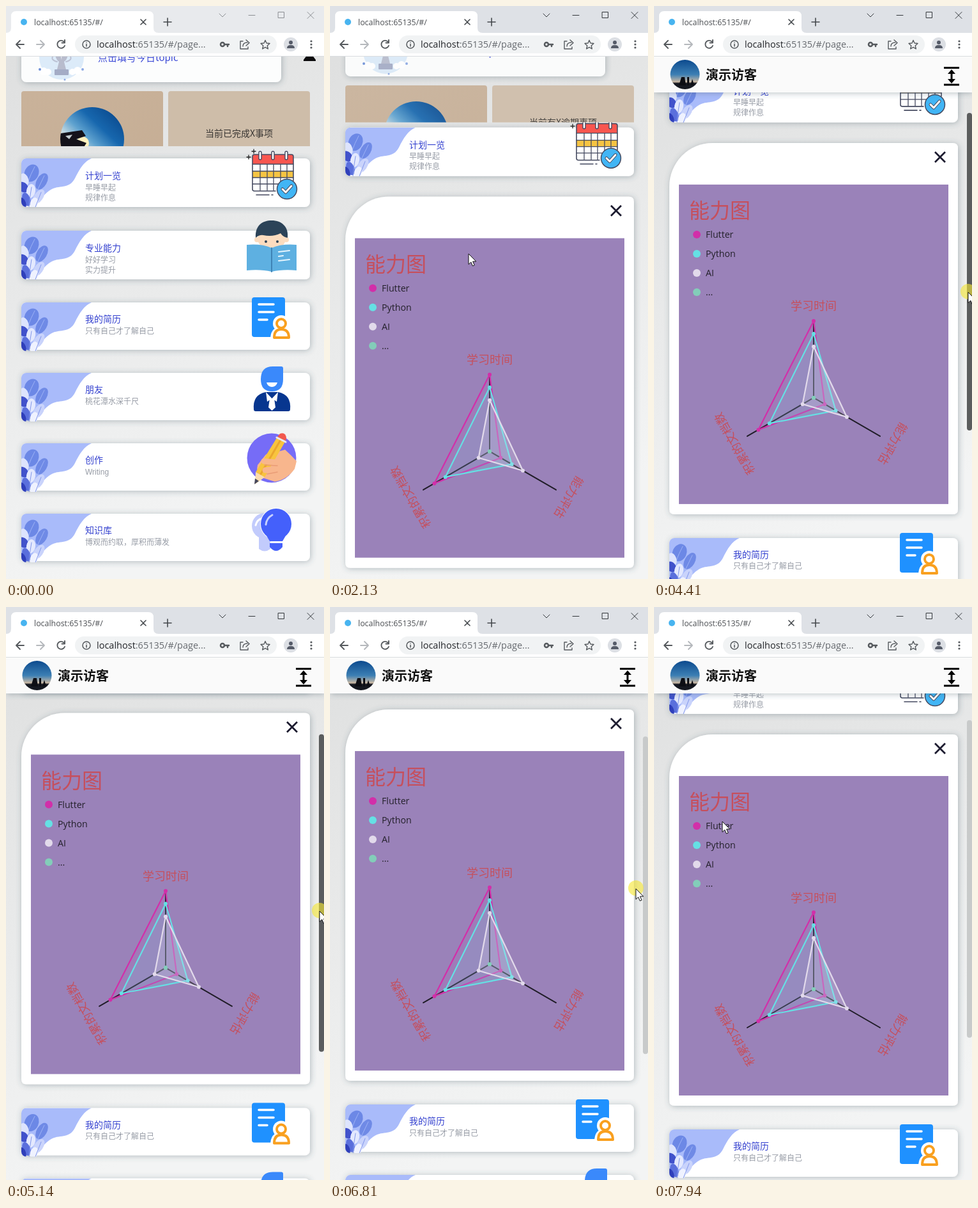
An HTML page for the animation above (8 s loop, 498x895 px).

```html
<!DOCTYPE html>
<html lang="zh">
<head>
<meta charset="utf-8">
<title>Page</title>
<style>
html, body { margin: 0; width: 100%; height: 100%; overflow: hidden; background: #e8e9e9; }
svg { display: block; width: 498px; height: 895px; font-family: "Noto Sans CJK SC", "Noto Sans CJK", sans-serif; }
.ui { font-family: "Open Sans", "Noto Sans", sans-serif; }
.line { fill: none; stroke-linecap: round; stroke-linejoin: round; }
.title { font-size: 14px; fill: #3441cf; }
.sub { font-size: 12px; fill: #979ca6; font-family: "Liberation Sans", "Noto Sans CJK SC", sans-serif; }
.red { fill: #c64f5c; font-weight: 300; }
</style>
</head>
<body>
<svg id="stage" viewBox="0 0 498 895"></svg>
<script>
const stage = document.getElementById('stage');
const $ = id => document.getElementById(id);
const line = (d, color, w = 2, extra = '') => `<path class="line" d="${d}" stroke="${color}" stroke-width="${w}" ${extra}/>`;
const shape = (d, fill, extra = '') => `<path d="${d}" fill="${fill}" ${extra}/>`;
const rect = (x, y, w, h, fill, r = 0, extra = '') => `<rect x="${x}" y="${y}" width="${w}" height="${h}" rx="${r}" fill="${fill}" ${extra}/>`;
const dot = (x, y, r, fill, extra = '') => `<circle cx="${x}" cy="${y}" r="${r}" fill="${fill}" ${extra}/>`;
const oval = (x, y, rx, ry, fill, turn = 0) => `<ellipse cx="${x}" cy="${y}" rx="${rx}" ry="${ry}" fill="${fill}" transform="rotate(${turn} ${x} ${y})"/>`;
const text = (x, y, s, attrs = '') => `<text x="${x}" y="${y}" ${attrs}>${s}</text>`;
const group = (id, body, attrs = '') => `<g id="${id}" ${attrs}>${body}</g>`;

const defs = `<defs>
  <linearGradient id="page" x1="0" y1="0" x2=".25" y2="1"><stop offset="0" stop-color="#dddede"/><stop offset="1" stop-color="#f3f4f4"/></linearGradient>
  <linearGradient id="sky" x1=".9" y1="0" x2=".2" y2=".75"><stop offset="0" stop-color="#084488"/><stop offset=".4" stop-color="#1767ae"/><stop offset=".65" stop-color="#5fa2cf"/><stop offset=".88" stop-color="#d5e2e4"/><stop offset="1" stop-color="#f3dfae"/></linearGradient>
  <linearGradient id="dusk" x1="0" y1="0" x2="0" y2="1"><stop offset="0" stop-color="#0c4a8e"/><stop offset=".5" stop-color="#3c7fb4"/><stop offset=".75" stop-color="#c9b8a4"/><stop offset=".8" stop-color="#151820"/></linearGradient>
  <linearGradient id="tan" x1="0" y1="0" x2="1" y2="1"><stop offset="0" stop-color="#c9b29a"/><stop offset="1" stop-color="#c6ae95"/></linearGradient>
  <filter id="shadow" x="-10%" y="-30%" width="120%" height="170%"><feDropShadow dx="1.1" dy="1.1" stdDeviation="5" flood-color="#3a5160" flood-opacity=".36"/></filter>
  <clipPath id="cardClip"><rect width="452" height="76" rx="8"/></clipPath>
  <clipPath id="photoClip"><circle cx="135" cy="208" r="50"/></clipPath>
  <clipPath id="headClip"><rect id="headBox" y="78" width="498" height="141"/></clipPath>
  <clipPath id="listClip"><rect id="listBox" y="219" width="498" height="895"/></clipPath>
  <clipPath id="panelClip"><path id="panelCut"/></clipPath>
  <g id="decor" clip-path="url(#cardClip)">
    ${shape('M0 0H110C98 5 91 17 84 31C75 49 58 41 46 49C33 57 27 72 6 75L0 76Z', '#a9bbfa')}
    ${oval(16, 23, 11, 14, '#6c88e6', 25)}${line('M10 38Q15 24 21 13', '#9db2f6', 1)}
    ${oval(32, 36, 8, 14, '#6f8ae6', 30)}${line('M24 52L36 27', '#9db2f6', 1)}
    ${oval(5, 33, 6, 10, '#dde4fd', -20)}${oval(3, 45, 7, 9, '#4152cb', -40)}
    ${oval(15, 51, 7, 11, '#e4e9fe', 10)}${oval(27, 60, 7, 13, '#c9d3fb', 35)}
    ${oval(8, 64, 6, 11, '#5a6fdc', -20)}${oval(20, 70, 6, 9, '#eff2ff', 20)}
    ${oval(2, 70, 5, 9, '#2f3fba', -20)}${line('M12 76Q13 61 16 45M22 76L31 53', '#8196ea', 1)}
  </g></defs>`;

// Card icons use stage x and y measured from the card's top edge.
const ink = '#454a60';
const icons = [
  rect(386, -5, 64, 61, '#fff', 3) + shape('M386 9V-3Q386 -6 389 -6H447Q450 -6 450 -3V9Z', '#f9564f') + rect(386, 20, 64, 10, '#f5c443') +
  line('M386 9H450M386 20H450M386 30H450M386 40H430M398 9V50M409 9V50M419 9V50M430 9V40M440 9V33', ink, 1.3) +
  line('M422 51H389Q386 51 386 48V-3Q386 -6 389 -6H447Q450 -6 450 -3V35M392 57H412M416 57H418', ink, 1.6) +
  [398, 418, 439].map(x => rect(x - 2, -11, 4, 13, '#fff', 2, `stroke="${ink}" stroke-width="1.4"`)).join('') +
  line('M377 -2H383M380 -5V1M385 -11H391M388 -14V-8', '#222', 1.3) +
  dot(440, 48, 15.5, '#41b5f5', `stroke="${ink}" stroke-width="1.5"`) + line('M433 48L438 53L447 43', ink, 5) + line('M433 48L438 53L447 43', '#fff', 3),

  oval(416, 12, 22, 18, '#fcdcbf') + dot(393, 14, 4, '#fcdcbf') + dot(439, 14, 4, '#fcdcbf') +
  shape('M391 11C390 -9 402 -16 416 -16C432 -16 443 -6 441 11Q434 10 430 4Q418 10 403 7Q397 6 391 11Z', '#2c4358') +
  dot(407, 17, 2, '#2c4358') + dot(425, 17, 2, '#2c4358') +
  shape('M377 22Q400 20 416 27Q432 20 455 22V62Q433 60 416 64Q399 60 377 62Z', '#5eb0e1') + line('M416 27V64', '#3f83b5', 2) +
  line('M427 33L444 31M427 40L434 39M427 47L444 45', '#e6f5fd', 2),

  rect(385, -8, 52, 62, '#1f91ff', 4) + line('M396 3H419M396 15H419M396 27H409', '#fff', 3.5) +
  dot(431, 33, 13, '#fff') + shape('M414 58Q414 38 431 38Q449 38 449 58Z', '#fff') +
  dot(431, 33, 7, '#fff', 'stroke="#f9a01f" stroke-width="4"') + line('M420 55Q420 42 431 42Q443 42 443 55Z', '#f9a01f', 4),

  shape('M399 10Q399 -10 418 -10H431Q434 -10 434 -7V10Q434 29 416.5 29Q399 29 399 10Z', '#3a89fb') + shape('M408 15H425Q423 22 416.5 22Q410 22 408 15Z', '#fff') +
  shape('M388 57Q386 34 407 30H426Q447 34 445 57Q445 60 442 60H391Q388 60 388 57Z', '#07368f') +
  shape('M407 30L416.5 40L426 30L424 45L416.5 40L409 45Z', '#fff') + shape('M413 40H420L422 54L416.5 59L411 54Z', '#fff'),

  dot(416, 23, 38.5, '#766cf7') + shape('M452 40Q440 57 421 60L399 53Q391 45 394 34L405 20Q409 14 416 16L437 10Q446 18 455 28Z', '#f8b68d') +
  shape('M425 -10L438 -4L405 53L391 45Z', '#f8c43e') + line('M431 -7L399 48', '#eba62f', 3) +
  shape('M425 -10L429 -15Q438 -18 439 -8L438 -4Z', '#f2584e') + line('M424 -9L438 -2', '#e8e6ec', 3) +
  shape('M391 45L405 53L390 64Z', '#fbdcae') + shape('M390 55L396 59L389 64Z', '#45465a') +
  line('M404 28L423 30M406 42L424 40', '#f8b68d', 9) + line('M405 34L425 35M409 48L425 45', '#e99c76', 1.5),

  dot(405, 19, 20, '#c2cbfc') + shape('M396 34H414V55Q405 62 396 55Z', '#c2cbfc') + line('M391 18Q393 9 402 7', '#fff', 3) +
  dot(423, 16, 25, '#fff') + dot(423, 16, 24, '#4460fb') + shape('M406 31H440L433 43H413Z', '#4460fb') +
  shape('M413 46H433V52Q423 64 413 52Z', '#4460fb') + line('M407 17Q408 7 417 2', '#c6d0ff', 3)
];

const cards = [
  ['计划一览', '早睡早起', '规律作息'], ['专业能力', '好好学习', '实力提升'], ['我的简历', '只有自己才了解自己'],
  ['朋友', '桃花潭水深千尺'], ['创作', 'Writing'], ['知识库', '博观而约取，厚积而薄发']
];
const cardBody = (i) => {
  const [title, ...subs] = cards[i], lift = i > 1 ? 1 : 0;
  return `<use href="#decor" x="24"/>` + text(124, 32 - lift, title, 'class="title"') +
    subs.map((s, n) => text(124, 49.5 - lift + 16 * n, s, 'class="sub"')).join('') + icons[i];
};
const card = i => group('card' + i, rect(24, 0, 452, i < 2 ? 76 : 74, '#fff', 8, 'filter="url(#shadow)"') + cardBody(i));

// Radar chart
const mid = { x: 250, y: 398 };
const spoke = (k, r) => {
  const a = (k * 120 - 90) * Math.PI / 180;
  return [mid.x + r * Math.cos(a), mid.y + r * Math.sin(a)];
};
const series = [
  ['Flutter', '#d22fa9', [120, 20, 100], .08], ['Python', '#65e0e4', [100, 40, 80], .15],
  ['AI', '#e2daeb', [80, 60, 20], .2], ['...', '#83cdb9', [0, 0, 0], 0]
];
const web = ([, color, values, alpha]) => {
  const pts = values.map((v, k) => spoke(k, v));
  return `<polygon points="${pts.join(' ')}" fill="${color}" fill-opacity="${alpha}" stroke="${color}" stroke-width="2.2" stroke-linejoin="round"/>` +
    pts.map(p => dot(p[0], p[1], 3, color)).join('');
};
const chart = rect(39, 65, 422, 499, '#9a82b9') + text(55, 117, '能力图', 'class="red" font-size="32"') +
  series.map(([name, color], i) => dot(67, 143 + 30 * i, 6, color) + text(81, 148 + 30 * i, name, 'class="ui" font-size="14.2" fill="#24212b"')).join('') +
  [0, 1, 2].map(k => line(`M${mid.x} ${mid.y}L${spoke(k, 120)}`, '#201d28', 2)).join('') + series.map(web).join('') +
  ['学习时间', '能力评估', '积累的文档数'].map((s, k) =>
    `<g transform="translate(${spoke(k, 143)}) rotate(${120 * k})">${text(0, 6.5, s, 'class="red" font-size="18" text-anchor="middle"')}</g>`).join('') +
  line('M440 14L456 30M456 14L440 30', '#1d1c30', 2.8, 'style="stroke-linecap:butt"');
const panel = group('panel', '<path id="panelBack" fill="#fff" filter="url(#shadow)"/><g clip-path="url(#panelClip)">' +
  group('chart', chart) + '</g>' + group('closed', cardBody(1)));

const header = group('header',
  rect(24, 20, 407, 99, '#fcfdfd', 8, 'filter="url(#shadow)"') +
  dot(87, 80, 35, '#dcebf9') + dot(59, 102, 6, '#fff') + dot(66, 103, 5, '#fff') + dot(112, 101, 6, '#fff') + dot(104, 103, 5, '#fff') +
  shape('M76 60H98Q99 82 91 87L94 99H80L83 87Q75 82 76 60Z', '#b8bccd') + shape('M83 66H88L87 84Z', '#f2f3f8') + rect(76, 99, 22, 9, '#a4acc6', 1) +
  line('M75 76Q68 84 80 87M99 76Q106 84 94 87', '#bcc2d4', 2) + dot(53, 99, 2, '#6e90d8') + dot(120, 99, 2, '#8ca8e3') + dot(92, 115, 1.5, '#8ca8e3') +
  text(144, 86, '点击填写今日topic', 'font-size="15" fill="#3a48d6"') + shape('M466 84L472 76H479L485 84V86H466Z', '#0c0b0d') +
  rect(24, 133, 222, 130, 'url(#tan)', 4) + rect(254, 133, 222, 130, '#cebda9', 4) +
  '<g clip-path="url(#photoClip)">' + rect(85, 158, 100, 100, 'url(#sky)') + dot(120, 214, 10, '#fff0bd') +
  shape('M85 199L119 194L125 203L110 208L126 214L121 222H85Z', '#14121a') + shape('M93 203L104 201L99 208Z', '#c6cfd2') + '</g>' +
  text(312, 204, '当前已完成X事项', 'id="note" font-size="14" fill="#383532"'));

const bar = group('bar', rect(0, 79, 498, 56, '#fafafa', 0, 'filter="url(#shadow)"') +
  dot(48.5, 107, 23, 'url(#dusk)') + shape('M39 124L43 111H48L50 124ZM52 124V111H55V124ZM57 124L60 114L63 124Z', '#0d0e14') +
  text(81, 115, '演示访客', 'font-size="20" font-weight="700" fill="#111"') +
  line('M454 96.5H478M454 123H478M466 102V118', '#000', 3, 'style="stroke-linecap:butt"') + shape('M460 106L466 99L472 106ZM460 114L466 121L472 114Z', '#000'));

const grey = '#565a5e';
const chrome = rect(0, 0, 498, 42, '#e8eaed', 0, 'id="strip"') + rect(0, 42, 498, 37, '#fff') +
  shape('M0 42Q8 42 8 34V16Q8 8 16 8H223Q231 8 231 16V34Q231 42 239 42Z', '#fff') + rect(0, 78, 498, 1, '#d9dcdf') +
  dot(28, 25, 5, '#48b4f0') + text(44, 30, 'localhost:65135/#/', 'class="ui" font-size="12.4" fill="#4a4d51"') +
  line('M211 21L219 29M219 21L211 29M253 19V31M247 25H259', '#45494d', 1.6) +
  group('controls', line('M334 12L339 17L344 12M380 14.5H390M426.5 9.5H435.5V18.5H426.5ZM472 9.5L482 19.5M482 9.5L472 19.5', 'currentColor', 1)) +
  line('M28 60H16M22 54L16 60L22 66', grey, 1.9) + line('M48 60H60M54 54L60 60L54 66', '#b5b8bc', 1.9) +
  line('M91 56A6 6 0 1 0 92 62M92 53V57.5H87.5', grey, 1.9) + rect(108, 46, 316, 28, '#f1f3f4', 14) +
  dot(126, 60, 6, 'none', `stroke="${grey}" stroke-width="1.5"`) + line('M126 59.5V63M126 57V57', grey, 1.6) +
  text(142, 65, 'localhost<tspan fill="#666a6f">:65135/#/page...</tspan>', 'class="ui" font-size="14.5" fill="#222428"') +
  dot(339, 60, 3, 'none', `stroke="${grey}" stroke-width="2.5"`) + line('M342 60H349M347 60V63', grey, 2.5) +
  line('M371 55H367V67H379V64M371 63Q371 57 378 57M376 53L381 57.5L376 62', grey, 1.4) +
  line('M406 53.5L408 58L413 58.5L409.2 62L410.3 67L406 64.4L401.7 67L402.8 62L399 58.5L404 58Z', grey, 1.4) +
  dot(446, 60, 11, '#dcdfe4') + dot(446, 57, 3, '#555b68') + shape('M440 66Q440 61 446 61Q452 61 452 66Z', '#555b68') +
  [55, 60, 65].map(y => dot(478, y, 1.6, grey)).join('');

stage.innerHTML = defs + rect(0, 0, 498, 895, 'url(#page)') +
  `<g clip-path="url(#headClip)">${header}</g><g clip-path="url(#listClip)">${card(0)}${panel}${[2, 3, 4, 5].map(card).join('')}</g>` +
  rect(490, 167, 8, 496, '#5b5d5d', 4, 'id="thumb"') + bar + chrome +
  dot(0, 0, 12, '#f6e636', 'id="press" opacity=".62"') +
  group('cursor', shape('M0 0V16.5L3.8 13L6.4 19L9.2 17.8L6.6 12H11.8Z', '#fff', 'stroke="#111" stroke-width="1" stroke-linejoin="round"'));

// Each row: time, then values.
const keys = {
  card: [[1980, 238], [2130, 190], [2400, 106], [4410, 106], [4940, 57.5], [5140, 57.5], [5680, 72], [5880, 72], [6210, 37.5], [6280, 37.5],
    [6610, 52], [6810, 52], [7010, 64], [7210, 64], [7270, 69], [7480, 91]],
  head: [[1980, 219, 0, 1], [2130, 182, -9, .92], [2340, 145, -19, .3], [2400, 135, -21, 0]],
  open: [[1670, 0], [1940, 1]],
  bar: [[2270, 0], [2400, 1]],
  cursor: [[470, 437, 764], [600, 340, 690], [780, 200, 480], [930, 217, 387], [2540, 217, 387], [2780, 105, 480], [3000, 240, 640],
    [3270, 484, 674], [3410, 484, 674], [3750, 492, 447], [4410, 492, 447], [4940, 491, 475], [5140, 491, 475], [5680, 491, 484],
    [5880, 473, 460], [6210, 480, 425], [6280, 480, 425], [6610, 479, 440], [6810, 479, 440], [7010, 477, 453], [7210, 477, 453],
    [7270, 476, 458], [7480, 476, 479], [7540, 470, 479], [7940, 107, 335]]
};
const mix = (a, b, k) => a + (b - a) * k;
const at = (rows, t) => {
  const i = rows.findIndex(r => r[0] > t);
  if (i === 0) return rows[0].slice(1);
  if (i < 0) return rows[rows.length - 1].slice(1);
  const a = rows[i - 1], b = rows[i], k = (t - a[0]) / (b[0] - a[0]);
  return a.slice(1).map((v, n) => mix(v, b[n + 1], k));
};
const set = (id, attrs) => { for (const k in attrs) $(id).setAttribute(k, attrs[k]); };
const move = (id, x, y) => set(id, { transform: `translate(${x} ${y})` });
const show = (id, on) => set(id, { visibility: on ? 'visible' : 'hidden' });

function draw(t) {
  const [top] = at(keys.card, t), [edge, shift, fade] = at(keys.head, t), [raw] = at(keys.open, t);
  const open = raw * raw * (3 - 2 * raw), active = t >= 1600;
  set('strip', { fill: active ? '#dee1e6' : '#e8eaed' });
  set('controls', { color: active ? '#33373b' : '#8b8e92' });

  set('headBox', { height: edge - 78 });
  set('listBox', { y: edge });
  move('header', 0, shift);
  set('header', { opacity: fade });
  $('note').textContent = t < 1940 ? '当前已完成X事项' : '当前有X逾期事项';
  set('note', { y: t < 70 ? 204 : t < 140 ? 200 : 196 });
  set('bar', { opacity: at(keys.bar, t)[0] });

  const panelTop = top + mix(113, 108, open), h = mix(76, 580, open), r = mix(8, 68, open);
  const outline = `M24 ${r}A${r} ${r} 0 0 1 ${24 + r} 0H468Q476 0 476 8V${h - 8}Q476 ${h} 468 ${h}H32Q24 ${h} 24 ${h - 8}Z`;
  set('panelBack', { d: outline });
  set('panelCut', { d: outline });
  move('panel', 0, panelTop);
  set('chart', { opacity: open });
  set('closed', { opacity: 1 - open });
  move('card0', 0, top);
  for (let i = 2; i < 6; i++) move('card' + i, 0, panelTop + mix(112, 617, open) + 110 * (i - 2));

  show('thumb', t >= 3550);
  set('thumb', { y: 167 + (106 - top) / 1.53, fill: t < 5750 ? '#5b5d5d' : '#c8caca' });

  const [x, y] = at(keys.cursor, t);
  show('cursor', t >= 470);
  move('cursor', x, y);
  show('press', (t >= 4210 && t < 5600) || (t >= 5880 && t < 7480));
  set('press', { cx: x, cy: y - 1 });
}

const start = performance.now();
function tick() {
  draw((performance.now() - start) % 8000);
  requestAnimationFrame(tick);
}
tick();
</script>
</body>
</html>
```
